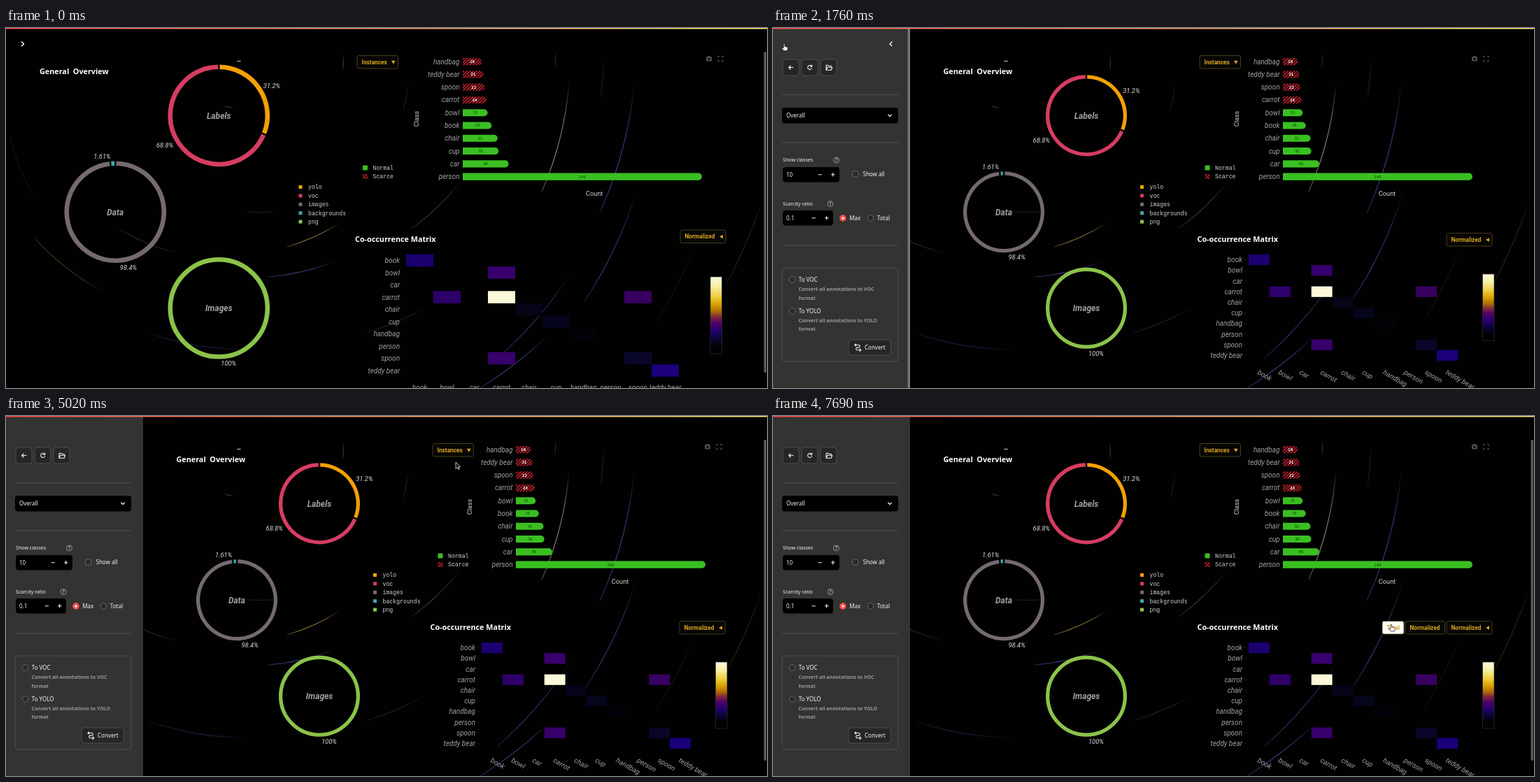
Write an HTML page that moves like this. It is 1088 px wide and 515 px high and loops after 8000 ms.

```html
<!DOCTYPE html>
<html lang="en">
<head>
<meta charset="utf-8">
<title>Dataset dashboard</title>
<style>
  html, body { margin: 0; height: 100%; overflow: hidden; background: #020102; }
  svg { display: block; width: 100vw; height: 100vh; }
  text { font: 8px "Noto Sans", "Open Sans", sans-serif; fill: #f4f4f4; white-space: pre; }
  .head { font-size: 10.8px; font-weight: 700; fill: #fff; }
  .ring { font: italic 700 12px Roboto, sans-serif; fill: #a0a0a0; }
  .pct { font: italic 9.4px Roboto, sans-serif; fill: #dcdcdc; }
  .tick { font: italic 10px Roboto, sans-serif; fill: #a0a0a0; }
  .axis { font: 9.2px Roboto, sans-serif; fill: #d4d4d4; }
  .key { font: 8.2px "Liberation Mono", monospace; fill: #d0d0d0; }
  .val { font: 5.6px "DejaVu Sans Mono", monospace; fill: #124a0a; }
  .val.bold { font-weight: 700; fill: #fff; }
  .btn { font: 700 8.3px Roboto, sans-serif; fill: #daa520; }
  .label { font-size: 7.1px; }
  .note { font-size: 7px; font-weight: 700; fill: #9a9a9a; }
  .mid { text-anchor: middle; }
  .end { text-anchor: end; }
  .line { fill: none; stroke: #f4f4f4; stroke-width: 1.1; stroke-linecap: round; stroke-linejoin: round; }
  .edge { fill: none; stroke: #56565a; stroke-width: .8; }
  .notch { fill: none; stroke: #303030; stroke-width: .7; }
</style>
</head>
<body>
<svg viewBox="0 0 1088 515" preserveAspectRatio="none">
  <defs>
    <linearGradient id="strip"><stop stop-color="#ff4b4b"/><stop offset="1" stop-color="#fff580"/></linearGradient>
    <linearGradient id="heat" x2="0" y2="1">
      <stop stop-color="#fdfbe0"/><stop offset=".12" stop-color="#faf0a8"/><stop offset=".25" stop-color="#efd040"/>
      <stop offset=".36" stop-color="#d8a000"/><stop offset=".45" stop-color="#b06a06"/><stop offset=".52" stop-color="#80283c"/>
      <stop offset=".6" stop-color="#50006a"/><stop offset=".7" stop-color="#260070"/><stop offset=".8" stop-color="#0a0538"/>
      <stop offset=".9" stop-color="#020208"/><stop offset="1" stop-color="#000"/>
    </linearGradient>
    <pattern id="hatch" width="3.2" height="3.2" patternUnits="userSpaceOnUse" patternTransform="rotate(45)">
      <path d="M0 0H3.2V3.2H0Z" fill="#1a0305"/><path d="M0 0H1.6V3.2H0Z" fill="#b8202b"/>
    </pattern>
  </defs>
  <g id="sky" fill="none" stroke-width="1.3"></g>
  <g id="dash"></g>
  <g id="menus"></g>
  <rect id="scroll" x="1083.6" y="34" width="3.4" height="459" rx="1.5" fill="#5c5c5c"/>
  <g id="opener">
    <rect id="openerBg" x="14" y="13" width="19" height="19" rx="4" fill="#333336"/>
    <path class="line" style="stroke-width:1.5" d="M22.5 19.8l3 2.9-3 2.9"/>
  </g>
  <g id="side"></g>
  <rect width="1088" height="1.4" fill="url(#strip)"/>
  <g id="cursor">
    <path id="arrow" d="M0 0V9.4L2.2 7.4L3.8 10.8L5.2 10.1L3.7 6.9H6.6Z" fill="#111" stroke="#eee" stroke-width=".8"/>
    <path id="hand" d="M-.9.6Q0-.6.9.6V4L4.4 4.8Q5.6 5.2 5.3 6.6L4.4 10H-.7L-3.2 6.8Q-3.2 5.4-1.8 5.9L-.9 6.6Z" fill="#fff" stroke="#111" stroke-width=".7"/>
  </g>
</svg>
<script>
const LOOP = 8000;
const $ = id => document.getElementById(id);
const text = (x, cy, s, cls = '', size = 8, more = '') =>
  `<text x="${x}" y="${cy + size * .35}" class="${cls}" ${more}>${s}</text>`;
const rect = (x, y, w, h, fill, rx = 0, more = '') =>
  `<rect x="${x}" y="${y}" width="${w}" height="${h}" rx="${rx}" fill="${fill}" ${more}/>`;
const line = (d, cls = 'line', more = '') => `<path class="${cls}" d="${d}" ${more}/>`;
const dot = (x, y, r, more = 'class="edge"') => `<circle cx="${x}" cy="${y}" r="${r}" ${more}/>`;

// Star trails: arcs around one pole that fade at both ends, listed as x1, y1, x2, y2, opacity
const POLE = [320, 30];
const trails = {
  '#c8b8b0': [[805, 78, 766, 234, .65], [245, 322, 162, 288, .22], [650, 220, 580, 287, .25], [388, 262, 345, 263, .14]],
  '#6060d0': [[898, 80, 849, 264, .6], [901, 235, 827, 391, .5], [808, 350, 702, 473, .45], [775, 440, 678, 515, .55],
    [470, 334, 375, 356, .6], [345, 460, 205, 437, .28], [45, 250, 5, 155, .16], [786, 35, 785, 55, .35]],
  '#c8a050': [[477, 279, 402, 313, .7], [140, 378, 40, 300, .28], [482, 38, 482, 60, .3], [575, 80, 568, 118, .16],
    [855, 45, 850, 100, .16], [1082, 245, 1030, 366, .2], [600, 400, 515, 436, .2], [985, 312, 930, 420, .1], [325, 114, 313, 112, .28]]
};
function trail(color, [a, b, c, d, o], id) {
  const r = Math.hypot((a + c) / 2 - POLE[0], (b + d) / 2 - POLE[1]);
  const stop = (at, alpha) => `<stop offset="${at}" stop-color="${color}" stop-opacity="${alpha}"/>`;
  return `<linearGradient id="${id}" gradientUnits="userSpaceOnUse" x1="${a}" y1="${b}" x2="${c}" y2="${d}">`
    + stop(0, 0) + stop(.3, o * .8) + stop(.7, o) + stop(1, o * .5) + '</linearGradient>'
    + `<path d="M${a} ${b}A${r} ${r} 0 0 1 ${c} ${d}" stroke="url(#${id})"/>`;
}
$('sky').innerHTML = Object.entries(trails).map(([color, list], i) =>
  list.map((arc, j) => trail(color, arc, `trail${i}-${j}`)).join('')).join('')
  + '<ellipse cx="333" cy="47.5" rx="3.2" ry="1" fill="#888"/>';

// Dashboard geometry: scrollbar shown, wide, and beside the open sidebar
const FIRST = { head: 48, r: 72.8, cx: 304.3, dx: 156.3, leg: 418.5, leg2: 510, btn: 502, axis: 587, bar: 653, barW: 342,
  icon: 1005, sub: 499, norm: 964, normY: 298, mx: 572, cw: 39, my: 323.8, ch: 17.5, cb: 1007, cbY: 356, cbH: 110, tilt: 0 };
const WIDE = { ...FIRST, head: 59.5, cx: 315.3, dx: 167.8, leg: 429, leg2: 521.5, btn: 514, axis: 598, bar: 664, barW: 341,
  icon: 1015, sub: 511, norm: 974.5, mx: 584.5, cw: 38.8, cb: 1017.5 };
const NARROW = { head: 243.5, r: 58, cx: 448, dx: 330, leg: 525, leg2: 617.5, btn: 610, axis: 662.5, bar: 729, barW: 271,
  icon: 1003, sub: 606.5, norm: 963, normY: 302.5, mx: 680, cw: 29.9, my: 324, ch: 15.2, cb: 1014.5, cbY: 352, cbH: 95, tilt: 30 };
const mix = (a, b, p) => Object.fromEntries(Object.keys(a).map(k => [k, a[k] + (b[k] - a[k]) * p]));

const ORANGE = '#f2a104', PINK = '#d63d62', GREY = '#746a70', TEAL = '#3fa9b0', LIME = '#8bc34a';
const classes = ['book', 'bowl', 'car', 'carrot', 'chair', 'cup', 'handbag', 'person', 'spoon', 'teddy bear'];
const charts = {
  instances: { color: '#3abf22', scarce: 4, max: 240, show: v => v, cls: 'val mid',
    rows: { handbag: 19, 'teddy bear': 21, spoon: 22, carrot: 24, bowl: 25, book: 29, chair: 35, cup: 36, car: 46, person: 240 } },
  images: { color: '#b012d4', scarce: 2, max: 59, show: v => v < 10 ? v.toFixed(1) : v, cls: 'val mid bold',
    rows: { spoon: 5, carrot: 3, handbag: 9, 'teddy bear': 6, bowl: 8, book: 6, chair: 9, cup: 10, car: 12, person: 59 } }
};
// row, column, colour
const cells = [[0, 0, '#1c0070'], [1, 3, '#38006e'], [3, 1, '#2e006a'], [3, 3, '#fcf9da'], [3, 8, '#380060'], [4, 4, '#050418'],
  [5, 5, '#05051c'], [6, 6, '#020209'], [8, 3, '#38006a'], [8, 8, '#09062a'], [9, 9, '#1b007a']];

function ring(x, y, r, name, parts) {
  const w = r * .09, m = r - w / 2;
  let turn = 0;
  const at = f => `${x + m * Math.sin(f * 2 * Math.PI)} ${y - m * Math.cos(f * 2 * Math.PI)}`;
  const gap = parts.length > 1 ? 1.2 / (2 * Math.PI * m) : 0;
  const arcs = parts.map(([color, share]) => {
    const a = turn + gap, b = (turn += share) - gap;
    const d = share === 1
      ? `M${at(0)}A${m} ${m} 0 0 1 ${at(.5)}A${m} ${m} 0 0 1 ${at(1)}`
      : `M${at(a)}A${m} ${m} 0 ${share > .5 ? 1 : 0} 1 ${at(b)}`;
    return `<path d="${d}" fill="none" stroke="${color}" stroke-width="${w}"/>`;
  });
  return arcs.join('') + text(x, y, name, 'ring mid', 12);
}

function bars(L, chart) {
  return Object.entries(chart.rows).map(([name, v], i) => {
    const y = 48.2 + i * 18.26, w = v / chart.max * L.barW, scarce = i < chart.scarce;
    return `<path d="M${L.bar} ${y - 5.1}h${w - 5.1}a5.1 5.1 0 0 1 0 10.2h${5.1 - w}z" fill="${scarce ? 'url(#hatch)' : chart.color}"/>`
      + text(L.bar - 4.5, y, name, 'tick end', 10)
      + text(L.bar + w / 2, y, chart.show(v), scarce ? 'val mid bold' : chart.cls, 5.6);
  }).join('');
}

function matrix(L) {
  const box = cells.map(([r, c, color]) => rect(L.mx + c * L.cw, L.my + r * L.ch, L.cw, L.ch, color)).join('');
  const rows = classes.map((s, i) => text(L.mx - 9, L.my + (i + .5) * L.ch, s, 'tick end', 10)
    + line(`M${L.mx - 6} ${L.my + (i + .5) * L.ch}h2.5`, 'notch')).join('');
  const tilted = L.tilt > 15;
  const cols = classes.map((s, i) => {
    const x = L.mx + (i + .5) * L.cw - (tilted ? 3 : 0), y = tilted ? 494.5 : 518;
    return `<text class="tick${tilted ? '' : ' mid'}" transform="translate(${x} ${y}) rotate(${L.tilt})">${s}</text>`;
  }).join('');
  return box + rows + cols + rect(L.cb, L.cbY, 16.5, L.cbH, 'url(#heat)', 0, 'stroke="#303030" stroke-width=".7"');
}

function dashboard(L, mode) {
  const { r, cx, dx } = L, chart = charts[mode], x = L.icon;
  const pct = (px, py, s) => text(px, py, s, 'pct', 9.4);
  const keys = [['yolo', ORANGE], ['voc', PINK], ['images', GREY], ['backgrounds', TEAL], ['png', LIME]];
  return text(L.head, 61.8, 'General  Overview', 'head', 10.8)
    + ring(cx, 125.3, r, 'Labels', [[ORANGE, .312], [PINK, .688]])
    + ring(dx, 263.3, r, 'Data', [[GREY, .9839], [TEAL, .0161]])
    + ring(cx, 400.8, r, 'Images', [[LIME, 1]])
    + pct(cx + .77 * r + 7.5, 119 - .5 * r, '31.2%') + pct(cx - .87 * r - 26, 131.5 + .5 * r, '68.8%')
    + pct(dx - 31, 256.7 - r, '1.61%') + pct(dx + 6.5, 269.5 + r, '98.4%') + pct(cx + 3, 407.3 + r, '100%')
    + keys.map(([s, c], i) => rect(L.leg, 225 + i * 12.4, 5, 5, c) + text(L.leg + 13.5, 227.5 + i * 12.4, s, 'key', 8.2)).join('')
    + ['Normal', 'Scarce'].map((s, i) => rect(L.leg2, 196.6 + i * 12.4, 7, 7, i ? 'url(#hatch)' : chart.color, 1)
      + text(L.leg2 + 14.5, 200 + i * 12.4, s, 'key', 8.2)).join('')
    + bars(L, chart)
    + `<text class="axis mid" transform="translate(${L.axis + 3} 130) rotate(-90)">Class</text>`
    + text(L.bar + L.barW * .55, 237, 'Count', 'axis mid', 9.2)
    + rect(x - 4, 41, 8, 6.5, '#4c4c4c', 1.2) + rect(x - 1.6, 40, 3.2, 2, '#4c4c4c') + dot(x, 44.3, 1.7, 'fill="#111"')
    + line(`M${x + 13} 42.5v-2h2M${x + 18} 40.5h2v2M${x + 20} 45.5v2h-2M${x + 15} 47.5h-2v-2`, 'edge', 'style="stroke-width:1.1"')
    + text(L.sub, 302, 'Co-occurrence Matrix', 'head', 10.8)
    + matrix(L);
}

function sidebar() {
  const number = (y, w, s) => rect(14, y, w, 21.5, '#000', 4) + text(19, y + 10.7, s)
    + line(`M${w - 16} ${y + 10.7}h4.4M${w + 2.4} ${y + 10.7}h4.6M${w + 4.7} ${y + 8.4}v4.6`);
  const help = (x, y) => dot(x, y, 4, 'fill="none" stroke="#aaa" stroke-width=".8"') + text(x, y, '?', 'label mid', 6.5);
  const radio = (x, y, s) => dot(x, y, 4.2, 'fill="#29292a" stroke="#77777b" stroke-width=".8"') + text(x + 9.3, y, s);
  const note = (y, s) => text(36.5, y, s, 'note', 7);
  const frame = (x, y, w, h, fill) => rect(x, y, w, h, fill, 4, 'stroke="#56565a" stroke-width=".8"');
  return rect(0, 0, 196, 515, '#333332')
    + [14, 41, 68].map(x => frame(x, 45, 23, 23, '#262628')).join('')
    + line('M22.8 56.5h6M25 54l-2.4 2.5 2.4 2.5')
    + line('M55.3 55a3 3 0 1 0 .1 2.6M55.6 53v2.2h-2.2')
    + line('M76 60.2v-7h2.5l1 1h3.6v1.6M76 60.2l1.7-4h7l-1.6 4z')
    + [95.5, 164, 311].map(y => line(`M13 ${y}H179`, 'edge')).join('')
    + rect(13, 114, 166, 22.5, '#000', 4) + text(19, 125.3, 'Overall') + line('M164.6 124l2.4 2.5 2.4-2.5')
    + text(14, 189, 'Show classes', 'label', 7.1) + help(90.5, 189) + number(199, 81, '10')
    + rect(113.6, 204.8, 8.2, 8.2, '#29292a', 2, 'stroke="#77777b" stroke-width=".8"') + text(128.5, 209, 'Show all')
    + text(14, 251.5, 'Scarcity ratio', 'label', 7.1) + help(82, 251.5) + number(261, 72, '0.1')
    + radio(100, 272, 'Max') + dot(100, 272, 4.7, 'fill="#ff4b4b"') + dot(100, 272, 1.7, 'fill="#fff"') + radio(139.5, 272, 'Total')
    + frame(13, 343, 166, 134, 'none')
    + radio(27.5, 360, 'To VOC') + note(374, 'Convert all annotations to VOC') + note(386.5, 'format')
    + radio(27.5, 405, 'To YOLO') + note(418.5, 'Convert all annotations to YOLO') + note(431, 'format')
    + frame(108, 446, 60.5, 22, '#262628')
    + line('M117 453.5h5.5a1.8 1.8 0 0 1 0 3.6h-2a1.8 1.8 0 0 0 0 3.6h5M124 458.8l1.8 1.9-1.8 1.9M118.6 452l-1.7 1.5 1.7 1.5')
    + text(131, 457, 'Convert')
    + '<g id="sideHover"><path class="line" style="stroke-width:1.4" d="M170 19.8l-3 2.9 3 2.9"/>'
    + rect(192.6, 0, 3.4, 515, '#77777a', 1.5) + '</g>';
}

// Pointer path: time, x, y of the tip
const path = [[0, 120, -30], [300, 120, -30], [880, 16, 22.5], [1780, 16, 22.5], [2210, 570, 86], [2260, 570, 86],
  [2700, 639.5, 47], [3100, 639.5, 47], [3500, 643, 84], [3860, 643, 84], [4100, 643, 79], [4190, 643, 79], [4310, 643, 50],
  [4350, 643, 50], [4430, 643, 66], [5610, 643, 66], [5950, 971, 273], [6260, 971, 273], [6490, 997, 299], [6780, 997, 299],
  [7540, 890, 299], [7570, 890, 299], [7690, 884, 298]];
const ease = p => p * p * (3 - 2 * p);
const span = (t, a, b) => ease(Math.min(1, Math.max(0, (t - a) / (b - a))));
const within = (t, a, b) => t >= a && t < b;

function pointer(t) {
  const i = path.findIndex(k => k[0] > t);
  if (i < 0) return path.at(-1).slice(1);
  const [a, x, y] = path[i - 1], [b, u, v] = path[i], p = span(t, a, b);
  return [x + (u - x) * p, y + (v - y) * p];
}

function buttons(L, t, mode) {
  const list = [
    { x: L.btn, y: 39.5, w: 58.5, s: mode === 'images' ? 'Images' : 'Instances', mark: 'M49 7.2h5.6l-2.8 5z' },
    { x: L.norm, y: L.normY - 9, w: 65, s: 'Normalized', mark: 'M61 6.8v5.4l-5-2.7z' }
  ];
  if (within(t, 3090, 3880) || within(t, 4320, 4860))
    list.push({ x: L.btn, y: 59.7, w: 58.5, s: 'Instances' }, { x: L.btn, y: 79.4, w: 58.5, s: 'Images' });
  if (t >= 6790)
    list.push({ x: L.norm - 59, y: L.normY - 9, w: 56.5, s: 'Normalized' }, { x: L.norm - 92, y: L.normY - 9, w: 31, s: 'Total' });
  return list;
}
const hit = (b, [x, y], h = 18.5) => within(x, b.x, b.x + b.w) && within(y, b.y, b.y + h);
const drawButton = b => rect(b.x, b.y, b.w, 18.5, b.hot ? '#fff' : '#070604', 2.5, 'stroke="#50431c" stroke-width=".9"')
  + text(b.x + 6.5, b.y + 9.2, b.s, 'btn', 8.3)
  + (b.mark ? `<path transform="translate(${b.x} ${b.y})" d="${b.mark}" fill="#daa520"/>` : '');

const shown = {};
function put(id, html) {
  if (shown[id] !== html) $(id).innerHTML = shown[id] = html;
}
const show = (id, on) => { $(id).style.display = on ? '' : 'none'; };

function frame(t) {
  const open = span(t, 1450, 1740);
  const L = t < 430 ? FIRST : mix(WIDE, NARROW, open);
  const mode = within(t, 3900, 4880) ? 'images' : 'instances';
  const tip = pointer(t), list = buttons(L, t, mode);
  list.forEach(b => { b.hot = hit(b, tip); });
  const overOpener = hit({ x: 14, y: 13, w: 19 }, tip, 19);
  const hand = overOpener || list.some(b => b.hot);

  put('dash', dashboard(L, mode));
  put('menus', list.map(drawButton).join(''));
  $('side').setAttribute('transform', `translate(${-196 * (1 - open)} 0)`);
  $('cursor').setAttribute('transform', `translate(${tip})`);
  show('side', open > 0);
  show('sideHover', tip[0] < 196);
  show('scroll', t < 430 || open === 1 && tip[0] >= 196);
  show('opener', open === 0);
  show('openerBg', overOpener);
  show('hand', hand);
  show('arrow', !hand);
}

put('side', sidebar());
frame(0);
let start;
requestAnimationFrame(function tick(now) {
  start ??= now;
  frame((now - start) % LOOP);
  requestAnimationFrame(tick);
});
</script>
</body>
</html>
```
